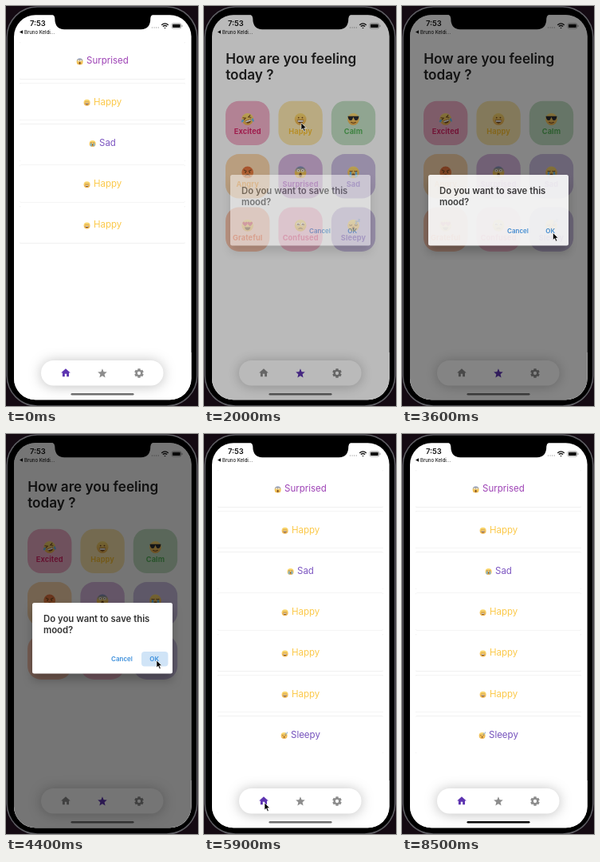
These frames come from a looping animation (241x500 px, 8.6 s). An HTML page:

```html
<!DOCTYPE html>
<html lang="en">
<head>
<meta charset="utf-8">
<title>Mood diary</title>
<style>
html, body { margin: 0; width: 100%; height: 100%; overflow: hidden; background: #140a12; }
svg { display: block; width: 100vw; height: 100vh; font-family: Inter, Roboto, sans-serif; }
.card { fill: #fff; filter: drop-shadow(0 .9px .6px rgba(0,0,0,.22)); }
.item { font-size: 11.5px; opacity: .86; }
.mood { font-size: 9.2px; font-weight: 700; letter-spacing: .12px; text-anchor: middle; opacity: .92; }
.title { font-size: 17.15px; font-weight: 600; fill: #242424; }
.ask { font-size: 11.35px; font-weight: 600; fill: #333; }
.btn { font-size: 8px; font-weight: 600; fill: #3d90dc; }
.pill { fill: #fff; filter: drop-shadow(0 1px 8px rgba(0,0,0,.25)); }
.box { fill: #fff; filter: drop-shadow(0 8px 6px rgba(0,0,0,.25)); }
</style>
</head>
<body>
<svg viewBox="0 0 241 500" preserveAspectRatio="none">
  <defs>
    <clipPath id="screen"><rect x="10" y="11.3" width="222.6" height="481" rx="27"/></clipPath>
    <linearGradient id="yellow" x2="0" y2="1"><stop stop-color="#fbdc73"/><stop offset="1" stop-color="#eeb04c"/></linearGradient>
    <linearGradient id="red" x2="0" y2="1"><stop stop-color="#e56f3d"/><stop offset="1" stop-color="#f2924a"/></linearGradient>
    <linearGradient id="fright" x2="0" y2="1"><stop stop-color="#6e86c4"/><stop offset=".5" stop-color="#f2cb66"/><stop offset="1" stop-color="#eeb04c"/></linearGradient>
  </defs>

  <rect width="241" height="500" fill="#140a12"/>
  <rect x="1.2" y="1" width="238.6" height="499" rx="38" fill="#000" stroke="#5e5e63" stroke-width="1.5"/>

  <g clip-path="url(#screen)">
    <rect width="241" height="500" fill="#fff"/>
    <g id="list"></g>
    <g id="grid">
      <text class="title" x="27.2" y="72">How are you feeling</text>
      <text class="title" x="27.2" y="92">today ?</text>
    </g>
    <rect x="10" y="433" width="223" height="60" fill="#fff"/>
    <rect class="pill" x="44" y="443" width="153.5" height="31.5" rx="15.7"/>
    <path id="home" transform="translate(68 451.6) scale(.58)" d="M10 20v-6h4v6h5v-8h3L12 3 2 12h3v8z"/>
    <path id="star" transform="translate(114 452.2) scale(.58)" d="M12 17.3 18.2 21l-1.7-7L22 9.2l-7.2-.6L12 2 9.2 8.6 2 9.2 7.5 14 5.8 21z"/>
    <g id="gear" transform="translate(167 459)" fill="#8c8c8c"></g>
    <rect id="bar" x="81.5" y="484" width="79" height="2.6" rx="1.3"/>

    <text x="30" y="24.8" font-size="9.4" font-weight="600" fill="#111">7:53</text>
    <path d="M17 32.5 21 30.2v4.6z" fill="#111"/>
    <text x="23" y="34.8" font-size="6" font-weight="500" fill="#222">Bruno Keldi...</text>
    <path d="M183.5 27h9" stroke="#aaa" stroke-width="1.4" stroke-linecap="round" stroke-dasharray="0 2.6"/>
    <g fill="none" stroke="#111" stroke-width="1.3">
      <path d="M195.2 23.7q4.3-3.6 8.6 0M196.8 25.6q2.7-2.2 5.4 0"/>
      <path d="M198.2 26.9h2.6l-1.3 1.4z" fill="#111" stroke="none"/>
    </g>
    <rect x="208" y="21.8" width="11.8" height="6.2" rx="1.7" fill="none" stroke="#888" stroke-width=".7"/>
    <rect x="209" y="22.8" width="9.8" height="4.2" rx=".9" fill="#111"/>
    <path d="M220.9 23.8v2.2" stroke="#888" stroke-width=".9"/>

    <rect id="dim" width="241" height="500"/>
    <g id="dialog">
      <rect class="box" x="33" y="211" width="176" height="88.5" rx="2.5"/>
      <text class="ask" x="47" y="235">Do you want to save this</text>
      <text class="ask" x="47" y="249">mood?</text>
      <rect id="press" x="170" y="272" width="33.5" height="18.5" rx="4" fill="#3d90dc" opacity=".24"/>
      <text class="btn" x="132" y="284">Cancel</text>
      <text class="btn" x="180.3" y="284">OK</text>
    </g>
  </g>
  <path d="M56 10.500q5 0 5.300 5 0 13.700 12 13.700h96q12 0 12-13.700.3-5 5.300-5z" fill="#000"/>
  <path id="cursor" d="M0 0v9l2.1-1.9 1.5 3.5 1.6-.7-1.5-3.4h2.8z" fill="#000" stroke="#fff" stroke-width=".6"/>
</svg>

<script>
const LOOP = 8600, STEP = 100;
const $ = id => document.getElementById(id);
const add = (id, html) => $(id).insertAdjacentHTML('beforeend', html);

// Faces are drawn in a circle of radius 10.
const dark = '#74491f';
const line = d => `<path d="${d}" fill="none" stroke="${dark}" stroke-width="1.4" stroke-linecap="round"/>`;
const fill = (d, c = dark) => `<path d="${d}" fill="${c}"/>`;
const dots = (x, y, r, c = dark) => [-x, x].map(v => `<circle cx="${v}" cy="${y}" r="${r}" fill="${c}"/>`).join('');
const grin = fill('M-5.5 1.500H5.500Q4.500 7 0 7T-5.500 1.500z') + fill('M-5 2h10l-.8 2.300h-8.400z', '#fff');
const heart = x => fill(`M${x} 1.5q-7-5-3-7.5 2-.8 3 1.5 1-2.3 3-1.5 4 2.500-3 7.500z`, '#dd4a5a');
const features = {
  Excited: `<g transform="rotate(-20)">${line('M-6.5-5 -2.5-3 -6.5-1M6.5-5 2.5-3 6.5-1')}${grin}</g>`
    + fill('M-9 0q4 1 2 4t-4 0zM9-2q-4 2-1 5t3-1z', '#6dbbe8'),
  Happy: dots(3.2, -2.6, 1.2) + grin,
  Calm: fill('M-9.5-5h19l-1 4q-1 3-4 3t-4-5h-1q-1 5-4 5t-4-3z', '#2a2d33') + line('M-4 5q4 3 8 0'),
  Angry: line('M-6-4 -2-2M6-4 2-2M-4 6q4-4 8 0') + dots(3.5, 0, 1.2),
  Surprised: dots(3.6, -3, 2.4, '#fff') + dots(3.6, -3, 1) + `<ellipse cy="4.5" rx="2.5" ry="3.8" fill="${dark}"/>`
    + fill('M-9 0q3-1 4 3l1 6q-5 1-5-9zM9 0q-3-1-4 3l-1 6q5 1 5-9z', '#f3c254'),
  Sad: line('M-6-2q2 1.5 4 0M6-2q-2 1.5-4 0') + fill('M-3.5 6q0-4 3.5-4t3.5 4z')
    + fill('M-6-1h3v10q-3 0-4-3zM6-1h-3v10q3 0 4-3z', '#6dbbe8'),
  Grateful: heart(-4.2) + heart(4.2) + fill('M-5 3H5Q4 8 0 8T-5 3z'),
  Confused: dots(3.8, -2, 2.8, '#fff') + line('M-5-2q1-2 2.5 0t-3 1M3-2q1-2 2.5 0t-3 1M-3 5.5q3-2 6 0'),
  Sleepy: line('M-6.5-1q2 2 4 0M2.5-1q2 2 4 0') + `<ellipse cy="4.5" rx="2" ry="2.3" fill="${dark}"/>`
    + '<path d="M3-7h4l-4 4h4M8-10h3l-3 3h3" fill="none" stroke="#6a93cf" stroke-width="1.3"/>'
};
const skins = { Angry: 'red', Surprised: 'fright' };
const face = (name, x, y, s) => `<g transform="translate(${x} ${y}) scale(${s})">
  <circle r="10" fill="url(#${skins[name] || 'yellow'})"/>${features[name]}</g>`;

// name, text colour, tile colour
const moods = [
  ['Excited', '#d81b60', '#f3b2cb'], ['Happy', '#fbc02d', '#fde9b0'], ['Calm', '#4caf50', '#c5e2c6'],
  ['Angry', '#fb9318', '#fdd8ae'], ['Surprised', '#8e24aa', '#dab9e2'], ['Sad', '#673ab7', '#cdc0e3'],
  ['Grateful', '#f4511e', '#fdc8b1'], ['Confused', '#ec407a', '#fdc0d5'], ['Sleepy', '#5e35b1', '#ccc0e3']
];
moods.forEach(([name, ink, tile], i) => {
  const x = 27 + i % 3 * 66.4, y = 118.7 + Math.floor(i / 3) * 66.4;
  add('grid', `<rect x="${x}" y="${y}" width="55.4" height="55.4" rx="17" fill="${tile}"/>
    ${face(name, x + 27.7, y + 22.8, .74)}
    <text class="mood" x="${x + 27.7}" y="${y + 41.2}" fill="${ink}">${name}</text>`);
});

const textX = { Surprised: 101, Happy: 110, Sad: 117, Sleepy: 109 };
['Surprised', 'Happy', 'Sad', 'Happy', 'Happy', 'Happy', 'Sleepy'].forEach((name, i) => {
  const y = 45 + i * 51.25, x = textX[name], ink = moods.find(m => m[0] === name)[1];
  add('list', `<g><rect class="card" x="17" y="${y}" width="208" height="46.6" rx="1.5"/>
    ${face(name, x - 8.4, y + 24.4, .4)}
    <text class="item" x="${x}" y="${y + 27.4}" fill="${ink}">${name}</text></g>`);
});

for (let a = 0; a < 360; a += 60)
  add('gear', `<rect x="-1.7" y="-5.8" width="3.4" height="3" rx=".5" transform="rotate(${a})"/>`);
add('gear', '<circle r="3.3" fill="none" stroke="#8c8c8c" stroke-width="2.3"/>');

// Keys are [time, values...]; each stretch eases in and out.
function at(keys, t) {
  const n = keys.findIndex(k => k[0] > t);
  if (n === 0) return keys[0].slice(1);
  if (n < 0) return keys[keys.length - 1].slice(1);
  const a = keys[n - 1], b = keys[n], p = (t - a[0]) / (b[0] - a[0]), e = p * p * (3 - 2 * p);
  return a.slice(1).map((v, i) => v + (b[i + 1] - v) * e);
}
const pointer = [
  [100, 184, 448], [700, 122, 459], [900, 122, 459], [1200, 133, 427], [1700, 122, 146], [2000, 122, 146],
  [2700, 184, 281], [3000, 185, 282], [3600, 189.5, 283.5], [4500, 189, 283], [4900, 170, 466],
  [5300, 76, 461], [6200, 76, 461], [6500, 136, 240], [6600, 136, 240], [7200, 133, 334],
  [7500, 133, 344], [8400, 241, 478]
];
const fade = [
  [1900, 0], [2100, 1], [2900, 1], [3000, .81], [3200, 0], [3500, 0], [3600, .89], [3700, 1], [4400, 1], [4700, 0]
];
const pull = [[6600, 0], [7200, 47], [7500, 52]];

const set = (id, name, value) => $(id).setAttribute(name, value);
const show = (el, on) => { el.style.display = on ? '' : 'none'; };

function draw(t) {
  const onGrid = t >= 900 && t < 5400;
  show($('grid'), onGrid);
  show($('list'), !onGrid);
  [...$('list').children].forEach((row, i) => show(row, i < 5 || t >= 5400));
  const back = Math.max(0, 1 - (t - 7500) / 700);
  const scroll = t < 7500 ? at(pull, t)[0] : 52 * back ** 3;
  set('list', 'transform', `translate(0 ${scroll})`);

  set('home', 'fill', onGrid ? '#8c8c8c' : '#5e35b1');
  set('star', 'fill', onGrid ? '#5e35b1' : '#8c8c8c');
  set('bar', 'fill', t < 7700 ? '#6f6f6f' : '#0a0a0a');

  const [k] = at(fade, t);
  set('dim', 'opacity', .54 * k);
  set('dialog', 'opacity', k);
  show($('dialog'), k > 0);
  show($('press'), (t >= 2900 && t < 3300) || t >= 4400);

  show($('cursor'), t >= 100 && t < 8400);
  set('cursor', 'transform', `translate(${at(pointer, t).join(' ')})`);
}

const start = performance.now();
function tick() {
  const t = (performance.now() - start) % LOOP;
  draw(Math.floor(t / STEP) * STEP);
  requestAnimationFrame(tick);
}
tick();
</script>
</body>
</html>
```
